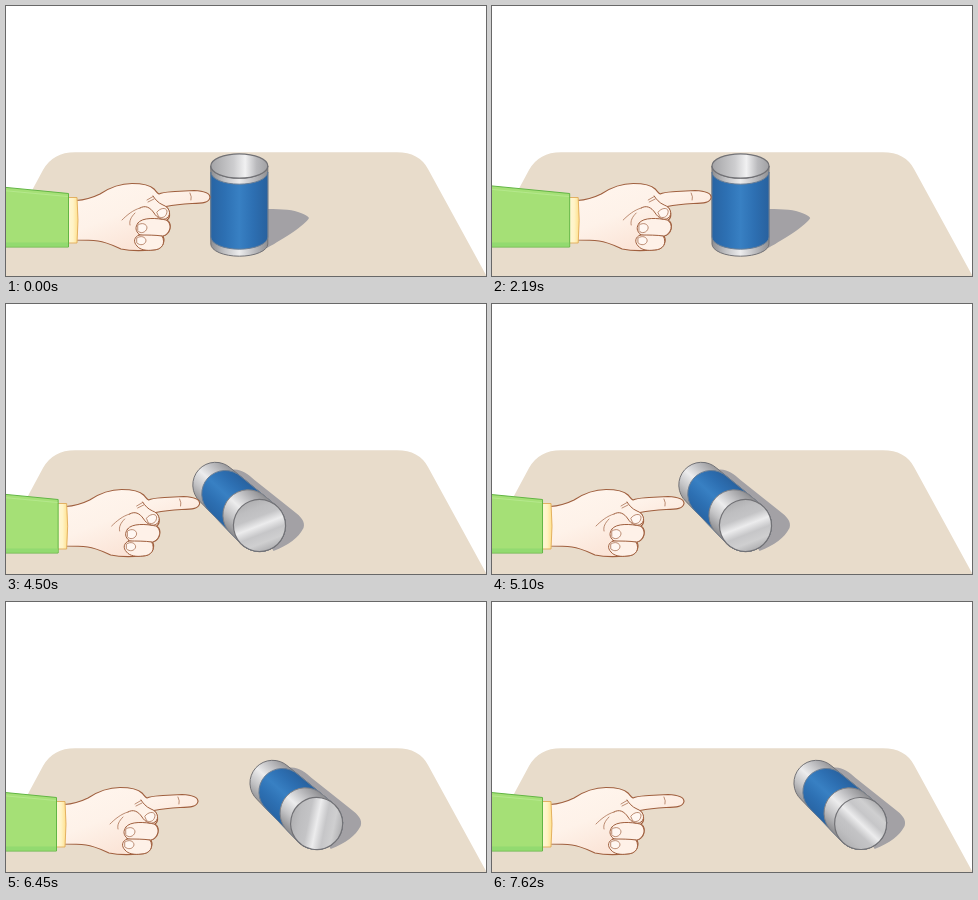
These frames come from a looping animation (480 px wide and 270 px high, 9 s). An HTML page with a canvas:

```html
<!DOCTYPE html>
<html lang="en">
<head>
<meta charset="utf-8">
<title>Pushing a can</title>
<style>
html, body { margin: 0; width: 100%; height: 100%; overflow: hidden; background: #fff; }
canvas { display: block; width: 480px; height: 270px; }
</style>
</head>
<body>
<canvas id="stage" width="480" height="270"></canvas>
<script>
const LOOP = 9000, TAU = Math.PI * 2;
const stage = document.getElementById('stage');
const view = stage.getContext('2d');
const layer = document.createElement('canvas');
layer.width = 480;
layer.height = 270;
const over = layer.getContext('2d');

const SKIN_LINE = '#a0603f', METAL_LINE = '#727276', SHADOW = '#a3a1a5';
const METAL = ['#8d8d90', '#c3c3c5', '#ececed', '#bdbdc0', '#8f8f92'];
const LABEL = ['#2864a3', '#2d70b3', '#3880c3', '#2d6fb2', '#28619e'];
const CAP = ['#b0b0b2', '#bebec0', '#c4c4c6', '#ececed', '#c6c6c8', '#cfcfd0', '#b0b0b2'];

const clamp = v => Math.max(0, Math.min(1, v));
const part = (t, a, b) => clamp((t - a) / (b - a));
const smooth = p => p * p * (3 - 2 * p);
const pulse = (t, a, b) => Math.sin(Math.PI * part(t, a, b));

function ramp(c, x0, y0, x1, y1, colors) {
  const g = c.createLinearGradient(x0, y0, x1, y1);
  colors.forEach((col, i) => g.addColorStop(i / (colors.length - 1), col));
  return g;
}

function paint(c, path, fill, line, width = 1) {
  const p = typeof path === 'string' ? new Path2D(path) : path;
  if (fill) { c.fillStyle = fill; c.fill(p); }
  if (line) { c.strokeStyle = line; c.lineWidth = width; c.stroke(p); }
}

function at(c, x, y, draw) {
  c.save();
  c.translate(x, y);
  draw();
  c.restore();
}

function table(c) {
  c.fillStyle = '#fff';
  c.fillRect(0, 0, 480, 270);
  paint(c, 'M-20 270L37 164Q47 146.300 69 146.300H391Q413 146.300 422 163L480.500 270Z', '#e8dccb');
}

function hand(c, dx, dy) {
  at(c, dx, dy, () => {
    c.lineJoin = c.lineCap = 'round';
    // palm, wrist and pointing finger
    paint(c, 'M70 194.500C80 194 88 191 94 188C103 182 113 177.500 126 177.500C137 177.500 145 180 148 183' +
      'C150 185 151 187 153 188C157 186 163 186 169 185.500L188 184.500C199 185 204 187.500 204 191.500' +
      'C203 196.500 197 197.500 186 197.500C176 198 167 199 160 200.500C164 204 165 211 161 214' +
      'C167 219 164 228 157 230C160 237 155 244 146 244C135 245 124 245 115 243C106 239 100 236 92 235' +
      'C84 234 77 234 70 234Z',
      ramp(c, 90, 180, 115, 244, ['#fff5ed', '#fef2e9', '#fbe5d8']), SKIN_LINE, 1.2);
    // curled fingers
    paint(c, 'M132 217C136 211 151 212 160 214C167 218 164 228 157 230C148 231 139 230 134 229C129 225 129 221 132 217Z',
      '#fef1e8', SKIN_LINE);
    paint(c, 'M133 229C141 229 150 229 156 230C160 237 156 244 147 244C141 245 134 244 131 240C127 236 128 231 133 229Z',
      '#fef1e8', SKIN_LINE);
    paint(c, 'M134 202C139 199 144 201 148 207C151 212 157 215 161 212C166 208 163 201 157 199C152 197 149 193 147 190',
      '#fef2e9', SKIN_LINE);
    // nails and creases
    paint(c, 'M151 206C154 202 160 201 161 205C161 210 157 213 153 211Z', '#fff7f2', SKIN_LINE, .7);
    paint(c, 'M132 219C136 216 141 218 141 222C140 227 134 228 132 225Z', '#fff7f2', SKIN_LINE, .7);
    paint(c, 'M131 232C135 229 140 231 140 235C139 239 134 240 131 237Z', '#fff7f2', SKIN_LINE, .7);
    paint(c, 'M134 202C127 204 121 209 116 214M129 207C125 211 123 215 124 219', null, SKIN_LINE, .7);
    paint(c, 'M141 194L147 190.500M142 196L148 193M184 187Q186 191 185 194', null, SKIN_LINE, .7);
    // cuff and sleeve
    paint(c, 'M61 191.500H71Q73 214 71 237H61Z', ramp(c, 62, 0, 72, 0, ['#fff6d4', '#fff3c6', '#ffe08c']), '#e0ab58', .9);
    paint(c, 'M-30 178.500L62.500 187.500V241H-30Z', '#a5e076', '#62b544', 1);
    paint(c, 'M-30 236.500H62V240.500H-30Z', '#92da70');
    paint(c, 'M-30 182L61.500 190.500', null, '#b9ea92', .8);
  });
}

// side wall of the upright can between two heights
function wall(c, top, bottom, colors, line) {
  const p = new Path2D();
  p.ellipse(233.3, top, 28.5, 12.2, 0, Math.PI, 0, true);
  p.lineTo(261.8, bottom);
  p.ellipse(233.3, bottom, 28.5, 12.2, 0, 0, Math.PI);
  p.closePath();
  paint(c, p, ramp(c, 204.8, 0, 261.8, 0, colors), line, 1);
}

function uprightCan(c, dx) {
  at(c, dx, 0, () => {
    paint(c, 'M255 203C272 203 284 203 292 206C298 208 302 210 303 212C299 219 279 232 261 242Z', SHADOW);
    wall(c, 160, 238, METAL, METAL_LINE);
    wall(c, 166, 231, LABEL, '#6a7e95');
    const rim = new Path2D();
    rim.ellipse(233.3, 160, 28.5, 12.2, 0, 0, TAU);
    paint(c, rim, ramp(c, 205, 0, 262, 0, ['#a4a4a7', '#b9b9bb', '#cdcdcf', '#f1f1f2', '#b9b9bc', '#a0a0a3']),
      METAL_LINE, 1.3);
  });
}

const BACK = { x: 210, y: 181, r: 22.7 }, FRONT = { x: 254, y: 221.5, r: 26 };
const AXIS = Math.atan2(FRONT.y - BACK.y, FRONT.x - BACK.x);

// lying can from position k along its axis up to the front
function roll(c, k, colors, line) {
  const mix = key => BACK[key] + (FRONT[key] - BACK[key]) * k;
  const x = mix('x'), y = mix('y'), r = mix('r'), q = Math.PI / 2;
  const p = new Path2D();
  p.arc(x, y, r, AXIS + q, AXIS - q);
  p.arc(FRONT.x, FRONT.y, FRONT.r, AXIS - q, AXIS + q);
  p.closePath();
  const nx = -Math.sin(AXIS) * 25, ny = Math.cos(AXIS) * 25;
  paint(c, p, ramp(c, x + nx, y + ny, x - nx, y - ny, colors), line, 1);
}

function lyingCan(c, dx) {
  at(c, dx, 0, () => {
    paint(c, 'M225 166C235 164 242 170 249 176L288 207C296 213 300 218 298 224C293 234 283 241 268 247Z', SHADOW);
    roll(c, 0, METAL, METAL_LINE);
    roll(c, .22, LABEL, '#6a7e95');
    roll(c, .74, METAL, '#828286');
    at(c, FRONT.x, FRONT.y, () => {
      c.rotate(-.38 - dx * .0175);
      const cap = new Path2D();
      cap.arc(0, 0, FRONT.r, 0, TAU);
      paint(c, cap, ramp(c, 0, -26, 0, 26, CAP), METAL_LINE, 1.2);
    });
  });
}

function streak(c, x, y, w, alpha) {
  c.save();
  c.globalAlpha *= alpha;
  c.lineCap = 'round';
  paint(c, `M${x} ${y}h${w}`, null, '#fff', 2.2);
  c.restore();
}

function slideScene(c, t) {
  const dx = 15.2 * smooth(part(t, 960, 1860));
  table(c);
  const glow = pulse(t, 1260, 1620);
  if (glow > 0) {
    streak(c, 170, 233, 14, glow);
    streak(c, 190, 233.500, 4, glow);
    streak(c, 198, 233.500, 9, glow);
  }
  uprightCan(c, dx);
  hand(c, dx, 0);
}

function rollScene(c, t) {
  const dx = 116.8 * smooth(part(Math.min(t, 7620), 5130, 7810));
  table(c);
  const glow = pulse(t, 5520, 5760);
  if (glow > 0) streak(c, 188, 208.500, 8, glow);
  lyingCan(c, dx - .5);
  hand(c, -12 + 2 * (1 - smooth(part(t, 4260, 5160))), 8);
}

function frame(now) {
  const t = now % LOOP;
  const fade = Math.pow(part(t, 2760, 4020), 1.25);
  if (fade < 1) slideScene(view, t);
  if (fade > 0) {
    rollScene(over, t);
    view.globalAlpha = fade;
    view.drawImage(layer, 0, 0);
    view.globalAlpha = 1;
  }
}

const start = performance.now();
function tick() {
  frame(performance.now() - start);
  requestAnimationFrame(tick);
}
tick();
</script>
</body>
</html>
```
